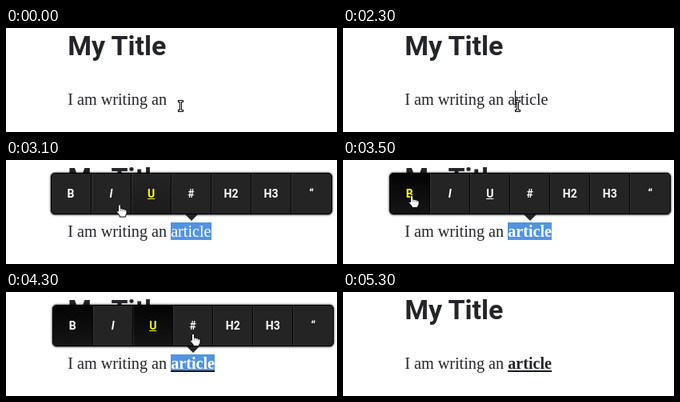
Animation, 414 px wide and 130 px high, one loop 6 s. Source, as an HTML page:

```html
<!DOCTYPE html>
<html lang="en">
<head>
<meta charset="utf-8">
<title>Inline editor toolbar</title>
<style>
  html, body { margin: 0; width: 100%; height: 100%; overflow: hidden; background: #fff; }
  #stage { position: relative; width: 414px; height: 130px; overflow: hidden; color: #242528; }
  h1, p { position: absolute; left: 77.2px; margin: 0; white-space: pre; }
  h1 { top: 2px; font: bold 34px/40px Roboto, sans-serif; }
  p { top: 78px; font: 20.2px/22px "Liberation Serif", serif; }
  #caret { position: relative; }
  #caret::after { content: ""; position: absolute; left: 0; bottom: 0; width: 1px; height: 22px; background: #000; }
  #caret.off { display: none; }
  .selected { background: #5294e2; color: #fff; }
  .bold { font-weight: bold; }
  .under { text-decoration: underline 2px #17191f; text-underline-offset: 2px; }

  #bar {
    position: absolute; display: flex; box-sizing: border-box; width: 352px; height: 52px;
    border: 1px solid #000; border-radius: 5px; background: #242424; box-shadow: 0 0 3px #000;
  }
  #bar::after {
    content: ""; position: absolute; left: 50%; bottom: -9px; margin-left: -8px;
    border: solid transparent; border-width: 8px 8px 0; border-top-color: #242424;
  }
  #bar span {
    box-sizing: border-box; width: 50px; height: 50px; text-align: center; color: #fff;
    font: bold 14px/50px Roboto, sans-serif;
    border-left: 1px solid rgba(255, 255, 255, .1); border-right: 1px solid #000;
    box-shadow: 0 2px 2px rgba(0, 0, 0, .3);
  }
  #bar span:first-child { border-left: 0; border-radius: 4px 0 0 4px; }
  #bar span:last-child { border-right: 0; border-radius: 0 4px 4px 0; }
  #bar span:nth-child(2) { font-style: italic; }
  #bar span:nth-child(3) { text-decoration: underline; }
  #bar .hover { color: #ff0; background: linear-gradient(#242424, #1b1b1b); }
  #bar .active { background: linear-gradient(#040404, #151515); }
  svg { position: absolute; left: 0; top: 0; }
</style>
</head>
<body>
<div id="stage">
  <h1>My Title</h1>
  <p>I am writing an <span id="word"><span id="before"></span><span id="caret"></span><span id="after"></span></span></p>
  <div id="bar"></div>
  <svg width="414" height="130" fill="none">
    <g id="beam" stroke-linecap="square">
      <path d="M-2-6H2M0-6V6M-2 6H2" stroke="#000" stroke-width="3"/>
      <path d="M-2-6H2M0-6V6M-2 6H2" stroke="#fff"/>
    </g>
    <g id="hand">
      <path d="M-1.6 1.4Q0-1 1.6 1.4V5.4Q3 4.6 4 5.9Q5.4 5.2 6.4 6.6Q8.6 6 9 8.2V11.5L7.6 14V15.6H.2V14L-3.6 9.4Q-3.6 7-1.6 8.6Z" fill="#fff" stroke="#000"/>
      <path d="M1.6 6V8.5M4 6.5V8.8M6.4 7V9" stroke="#555" stroke-width=".7"/>
    </g>
  </svg>
</div>
<script>
const LOOP = 6000, STEP = 100, WORD = "article", BAR_TOP = 16;
const KEYS = [200, 500, 900, 1200, 1500, 1800, 2000];
const CLICK = 2300, SELECT = 2500, BOLD = 3500, UNDERLINE = 4300, DESELECT = 4900, LEAVE = 5300;

// time, x, y of the pointer's hot spot
const PATH = [
  [2800, 218.5, 97.5], [2900, 201, 82], [3000, 172, 62], [3200, 112, 49], [3400, 86, 44],
  [3500, 86, 44], [3600, 98, 47], [3700, 118, 49], [4000, 178, 49], [4100, 194, 49],
  [4200, 194, 49], [4300, 234, 52], [4500, 246, 64], [4700, 259, 82], [4900, 266.5, 87.5],
  [5000, 265.5, 89.5], [5200, 263.5, 91.5]
];

const $ = id => document.getElementById(id);
const bar = $("bar"), start = performance.now();
const buttons = ["B", "I", "U", "#", "H2", "H3", "“"].map(label => {
  const b = document.createElement("span");
  b.textContent = label;
  return bar.appendChild(b);
});

function pointer(t) {
  const i = PATH.findIndex(k => k[0] >= t);
  if (i < 0) return PATH[PATH.length - 1].slice(1);
  if (i === 0) return PATH[0].slice(1);
  const [t0, x0, y0] = PATH[i - 1], [t1, x1, y1] = PATH[i];
  const f = (t - t0) / (t1 - t0);
  return [x0 + (x1 - x0) * f, y0 + (y1 - y0) * f];
}

const barLeft = t => t < BOLD ? 55.5 : 57.75;
const barShown = t => t >= SELECT && t < DESELECT;

function buttonAt(t) {
  const [x, y] = pointer(t);
  const inside = barShown(t) && y > BAR_TOP && y < BAR_TOP + 52;
  return inside ? Math.floor((x - barLeft(t) - 1) / 50) : -1;
}

function drawText(t) {
  const typed = KEYS.filter(k => t >= k).length;
  const at = t < CLICK ? typed : t < SELECT ? 1 : WORD.length;
  $("before").textContent = WORD.slice(0, at);
  $("after").textContent = WORD.slice(at, typed);
  const visible = t >= STEP && t < SELECT || t >= DESELECT && t < LEAVE;
  $("caret").className = visible ? "" : "off";
  const style = $("word").classList;
  style.toggle("selected", barShown(t));
  style.toggle("bold", t >= BOLD);
  style.toggle("under", t >= UNDERLINE);
}

function drawBar(t) {
  // pops up, overshoots by a pixel and settles
  const age = t - SELECT;
  const rise = age < STEP ? 2 : age < 2 * STEP ? -1 : 0;
  bar.style.visibility = barShown(t) ? "visible" : "hidden";
  bar.style.opacity = age < STEP ? .7 : 1;
  bar.style.left = barLeft(t) + "px";
  bar.style.top = BAR_TOP + rise + "px";
  // highlighting trails the pointer by one step
  const hover = buttonAt(t - STEP);
  buttons.forEach((b, i) => {
    b.classList.toggle("hover", i === hover);
    b.classList.toggle("active", i === 0 && t >= BOLD || i === 2 && t >= UNDERLINE);
  });
}

function drawPointer(t) {
  const over = buttonAt(t) >= 0;
  const place = `translate(${pointer(t).join(" ")})`;
  for (const [id, shown] of [["beam", !over], ["hand", over]]) {
    $(id).setAttribute("transform", place);
    $(id).style.display = shown && t < LEAVE ? "" : "none";
  }
}

function draw() {
  const t = Math.floor((performance.now() - start) % LOOP / STEP) * STEP;
  drawText(t);
  drawBar(t);
  drawPointer(t);
  requestAnimationFrame(draw);
}
draw();
</script>
</body>
</html>
```
